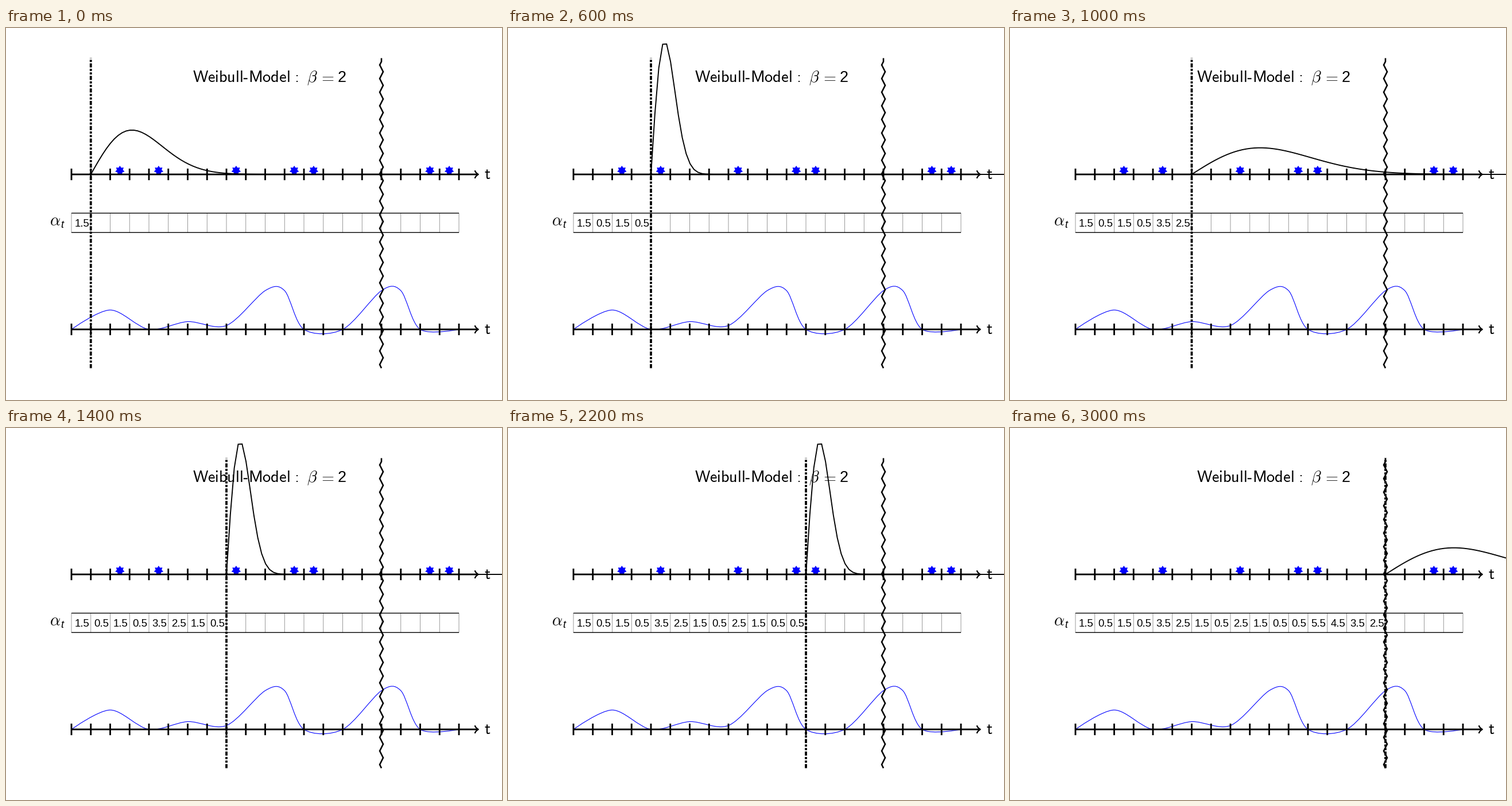
A matplotlib script that plays this animation: 864x648 px, repeating every 3200 ms.

```python
import matplotlib.pyplot as plt
import numpy as np
from matplotlib.animation import FuncAnimation
from matplotlib.patches import PathPatch
from matplotlib.path import Path

W, H = 864, 648
UNIT = 33.75            # pixels per time step
PT = W / 128 * 25.4 / 72.27
X0, Y_TOP, Y_LOW = 114, 255, 525
STEPS = 16
HEAVY = 1.2 * PT
EVENTS = [2.5, 4.5, 8.5, 11.5, 12.5, 18.5, 19.5]

plt.rcParams.update({
    "mathtext.fontset": "cm",
    "path.snap": False,
    "lines.solid_capstyle": "butt",
    "lines.solid_joinstyle": "miter",
})

fig = plt.figure(figsize=(W / 72, H / 72), dpi=72, facecolor="white")
ax = fig.add_axes([0, 0, 1, 1])
ax.set_xlim(0, W)
ax.set_ylim(H, 0)
ax.axis("off")


def px(t):
    return X0 + UNIT * np.asarray(t)


def line(x, y, lw, color="black", **kw):
    return ax.plot(x, y, color=color, lw=lw, **kw)[0]


def label(x, y, text, size=28.3, **kw):
    return ax.text(x, y, text, fontsize=size, va="baseline", **kw)


def time_axis(y):
    a = (0.28 + 0.3 * HEAVY / PT) * PT
    tip = px(21) - 0.75 * a
    line([px(0), tip], [y, y], HEAVY, zorder=4)
    for t in range(21):
        line([px(t)] * 2, [y - 10.1, y + 10.1], HEAVY, zorder=4)
    shape = np.array([(-3, 4), (-2.75, 2.5), (0, 0.25), (0.75, 0),
                      (0, -0.25), (-2.75, -2.5), (-3, -4)])
    head = Path(shape * a + (tip, y), [Path.MOVETO] + [Path.CURVE4] * 6)
    ax.add_patch(PathPatch(head, fill=False, lw=0.8 * HEAVY, zorder=4,
                           capstyle="round", joinstyle="round"))
    label(833, y + 8.3, r"$\mathsf{t}$")


def star(x, y, points=7, outer=8.4, inner=5.4):
    k = np.arange(2 * points)
    ang = np.pi / 2 + k * np.pi / points
    r = np.where(k % 2 == 0, outer, inner)
    ax.fill(x + r * np.cos(ang), y - r * np.sin(ang), color="blue",
            lw=0, zorder=3)


def smooth_curve(pts, tension=0.55):
    """Bezier path whose handles follow the chord between neighbours."""
    p = np.array(pts, float)
    h = np.zeros_like(p)
    h[1:-1] = 0.2761 * tension * (p[2:] - p[:-2])
    verts = [p[0]]
    for i in range(len(p) - 1):
        verts += [p[i] + h[i], p[i + 1] - h[i + 1], p[i + 1]]
    verts = np.array(verts) * (UNIT, -UNIT) + (X0, Y_LOW)
    path = Path(verts, [Path.MOVETO] + [Path.CURVE4] * (len(verts) - 1))
    ax.add_patch(PathPatch(path, fill=False, ec="blue", lw=1.1, zorder=2))


def zigzag(x, top, bottom, seg=10 * PT, amp=3):
    ys = np.arange(top + seg / 2, bottom, seg / 2)
    xs = x + amp * np.where(np.arange(len(ys)) % 2 == 0, -1, 1)
    line([x, x, *xs, x], [top, top + seg / 4, *ys, bottom], 2.55, zorder=5)


def weibull(t, scale):
    u = t / scale
    return 2 / scale * u * np.exp(-u ** 2)


# title
label(325.3, 94.5, r"$\mathsf{Weibull}$", 28)
line([413.8, 420.6], [88.2, 88.2], 2.1)
label(422, 94.5, r"$\mathsf{Model}$")
ax.plot([507.2] * 2, [93, 83.4], "s", color="black", ms=2.9, mew=0)
label(523.5, 94.5, r"$\beta$")
label(558.8, 94.5, "$=$", ha="center")
label(577.6, 94.5, "2", 27, family="Liberation Sans")

# table of alpha values
T_TOP, T_BOT = Y_TOP + 2 * UNIT, Y_TOP + 3 * UNIT
for t in range(21):
    line([px(t)] * 2, [T_TOP, T_BOT], 0.8, "gray")
for y in (T_TOP, T_BOT):
    line([px(0), px(20)], [y, y], 1.4)
label(76, 344.5, r"$\alpha$")
label(95.5, 348, "t", 18, family="Liberation Sans", style="italic")

# static diagrams
for e in EVENTS:
    star(px(e), Y_TOP - 0.2 * UNIT)
smooth_curve([(0, 0), (2, 1), (4, 0), (6, 0.4), (8, 0.2), (10, 2), (11, 2),
              (12, 0), (14, 0), (16, 2), (17, 2), (18, 0), (20, 0)])
time_axis(Y_TOP)
time_axis(Y_LOW)
TOP, BOTTOM = Y_TOP - 6 * UNIT, Y_LOW + 2 * UNIT
zigzag(px(16), TOP, BOTTOM)

# moving parts
alphas = [min(e for e in EVENTS if e > t) - t for t in range(1, STEPS + 1)]
values = [label(132.4 + UNIT * i, 346.3, f"{a:.1f}", 18.6, ha="center",
                family="Liberation Sans") for i, a in enumerate(alphas)]
density = line([], [], 0.8 * PT, zorder=6)
# dash, dot, dot; lengths in multiples of the line width
cursor = line([], [], 1.6 * PT, zorder=7,
              linestyle=(0, (1.875, 0.625, 1, 0.625, 1, 0.625)))
ts = np.linspace(0, 20, 100)


def update(n):
    now = n + 1
    cursor.set_data([px(now)] * 2, [BOTTOM, TOP])
    density.set_data(px(now + ts),
                     Y_TOP - 8 * UNIT * weibull(ts, 2 * alphas[n]))
    for i, v in enumerate(values):
        v.set_visible(i <= n)
    return [cursor, density, *values]


anim = FuncAnimation(fig, update, frames=STEPS, interval=200, repeat=True,
                     repeat_delay=0, blit=False)
plt.show()
```
